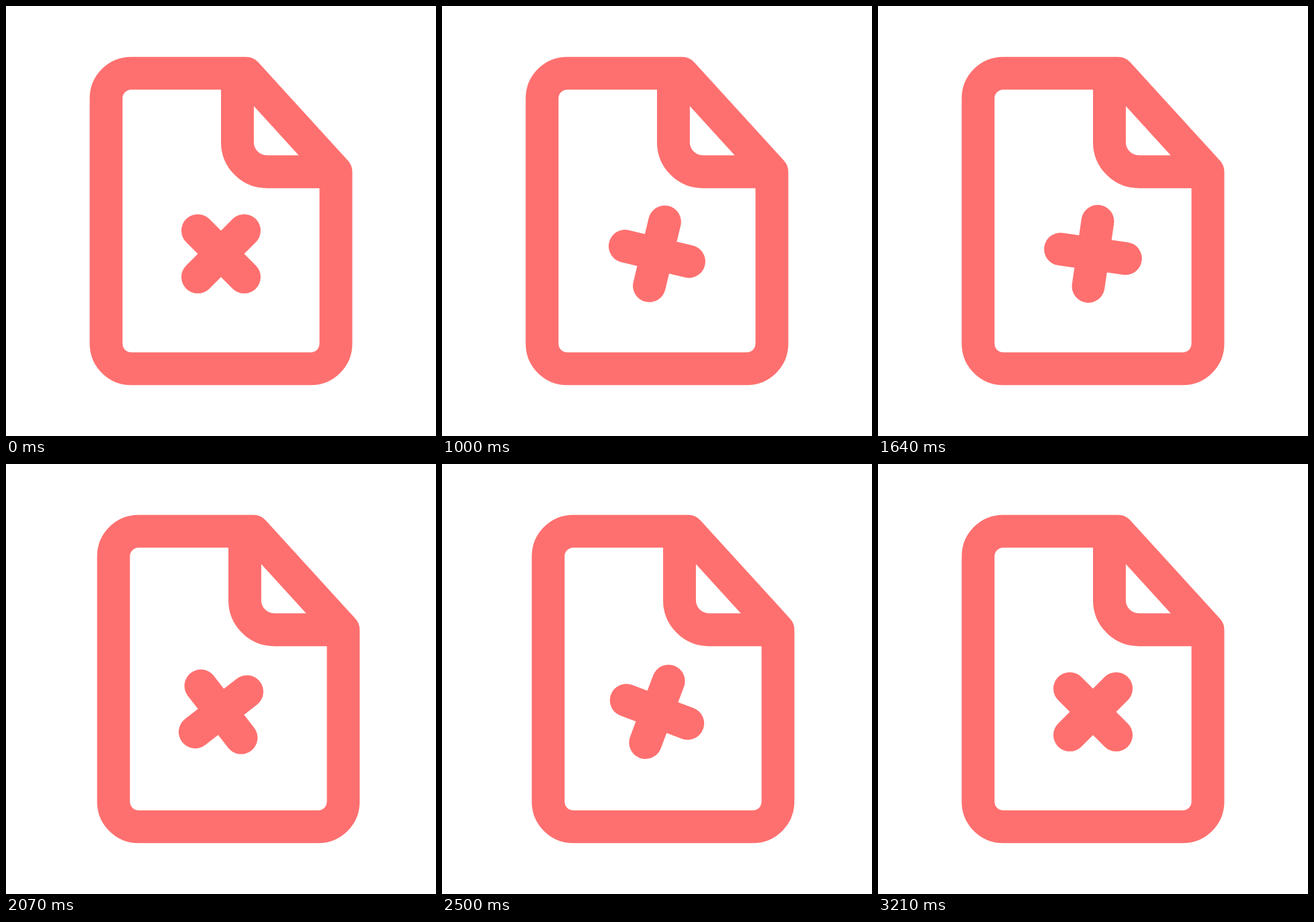
These frames come from a looping animation (640 px wide and 640 px high, 3930 ms). An HTML page:

```html
<!DOCTYPE html>
<html lang="en">
<head>
<meta charset="utf-8">
<title>Rejected file</title>
<style>
  html, body { margin: 0; width: 100%; height: 100%; overflow: hidden; background: #fff; }
  svg { display: block; width: 100%; height: 100%; }
</style>
</head>
<body>
<svg viewBox="0 0 640 640">
  <g transform="translate(320 320) scale(24.43) translate(-12 -12)"
     fill="none" stroke="#fe706f" stroke-width="2">
    <g id="page">
      <path stroke-linejoin="round" d="M13.53 3H6.53A1.53 1.53 0 0 0 5 4.53V19.47A1.53 1.53 0 0 0 6.53 21H17.47A1.53 1.53 0 0 0 19 19.47V9Z"/>
      <path d="M13 3V7.2A1.8 1.8 0 0 0 14.8 9H19"/>
    </g>
    <path id="cross" stroke-linecap="round" d="M12 12V16M10 14H14"/>
  </g>
</svg>
<script>
const LOOP = 3930;
const STEP = 1000 / 14;
const SPIN_STEPS = 45;
const TURN = 450;
const UNIT = 24.43;
const SWING = 29.6;
const page = document.getElementById('page');
const cross = document.getElementById('cross');

const clamp = x => Math.min(1, Math.max(0, x));
const smooth = u => u * u * (3 - 2 * u);
const bezier = (a, b, s) => 3 * s * (1 - s) ** 2 * a + 3 * s * s * (1 - s) * b + s ** 3;

// Slow start, fast middle, soft landing.
function spinEase(u) {
  let lo = 0, hi = 1;
  for (let i = 0; i < 30; i++) {
    const mid = (lo + hi) / 2;
    if (bezier(0.66, 0.363, mid) < u) lo = mid; else hi = mid;
  }
  return bezier(0.03, 1, lo);
}

// A short wind-up to the left, then one full swing right, left and home.
function shake(step) {
  const move = (from, to, distance) => distance * smooth(clamp((step - from) / (to - from)));
  const windUp = SWING / 3;
  return move(24, 25, -windUp) + move(25, 32.7, windUp + SWING)
    + move(32.7, 38.5, -2 * SWING) + move(38.5, 45, SWING);
}

function draw(ms) {
  const step = Math.floor((ms % LOOP + 5) / STEP);
  const angle = 45 + TURN * spinEase(clamp(step / SPIN_STEPS));
  cross.setAttribute('transform', `rotate(${angle} 12 14)`);
  page.setAttribute('transform', `translate(${shake(step) / UNIT} 0)`);
}

const start = performance.now();
function tick() {
  draw(performance.now() - start);
  requestAnimationFrame(tick);
}
tick();
</script>
</body>
</html>
```
